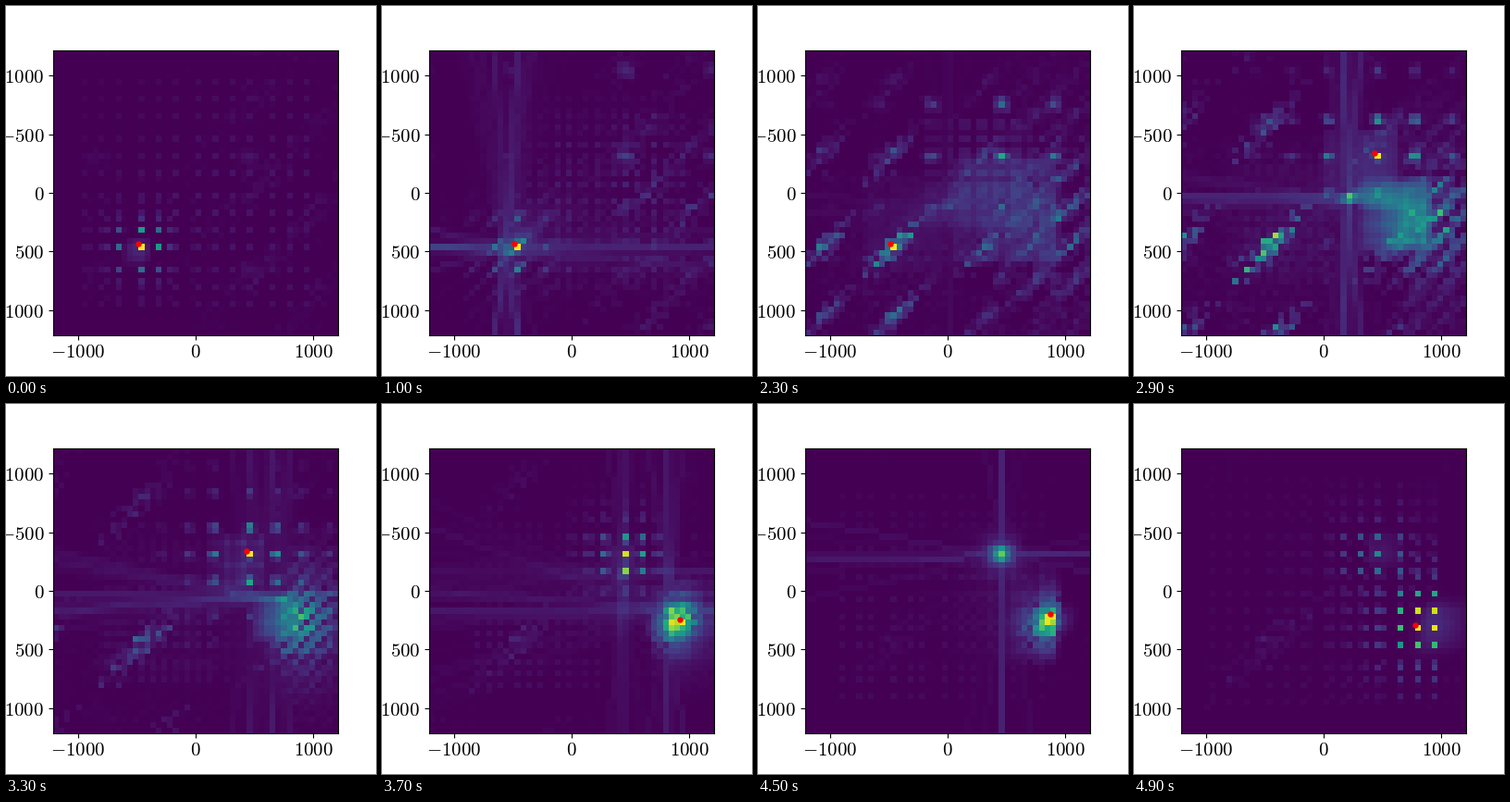
Write a matplotlib script that moves like this. It is 400 px wide and 400 px high and loops after 5000 ms.

```python
import numpy as np
import matplotlib.pyplot as plt
from matplotlib.animation import FuncAnimation

N = FRAMES = 50
HALF = 1212.6
CELL = 2 * HALF / N
rng = np.random.default_rng(4)

# Cameras sit in the centre of their cell, on an even grid on all six walls.
CAMERAS = np.floor(25.05 + 3.27 * np.arange(-6, 7)) + .5
CAM_X, CAM_Y = (g.reshape(-1, 1) for g in np.meshgrid(CAMERAS, CAMERAS))


def track(*keys, spacing=.25):
    """Hits (x, y, z, brightness) along straight pieces between keys."""
    keys = np.array(keys, float)
    lengths = np.linalg.norm(np.diff(keys[:, :3], axis=0), axis=1)
    along = np.append(0, np.cumsum(lengths))
    steps = np.arange(0, along[-1], spacing)
    hits = np.column_stack([np.interp(steps, along, k) for k in keys.T])
    hits[:, :3] += rng.normal(0, .2, (len(hits), 3))
    return hits


def knot(center, reach, blur, light, count=80):
    """A bright cluster of hits, drawn out along a diagonal."""
    pos = np.array(center) + rng.normal(0, blur, (count, 3))
    pos += rng.normal(0, reach, (count, 1)) * np.array([1, -1, 0])
    return np.column_stack([pos, np.full(count, light / count)])


TRACKS = np.vstack([
    track((15.5, 34.5, 4.6, .1), (12.8, 35.6, 10, .1), (19.8, 29.8, 15, .1),
          (24.5, 27.3, 23, .01), (31, 25.5, 32, .1), (41, 26.5, 34, .1),
          (43, 30, 41, .1)),
    track((33.5, 24, 35, .05), (34.4, 18.7, 42, .1)),
])
HITS = np.vstack([
    TRACKS,
    knot((15.5, 34.5, 4.6), .4, .12, 20),
    knot((42.9, 30.4, 41.8), 1.1, .2, 60),
    knot((34.5, 18.5, 43.5), 0, .15, 14),
])


def splat(x, y, weight):
    x, y, weight = (a.ravel() for a in np.broadcast_arrays(x, y, weight))
    img = np.histogram2d(y, x, bins=N, range=((0, N), (0, N)),
                         weights=weight)[0]
    return img / max(img.max(), 1e-9)


def end_wall(depth, z):
    """Rays from one end wall through the hits, cut at a depth."""
    x, y, _, light = HITS.T
    off_axis = (CAM_X - x) ** 2 + (CAM_Y - y) ** 2
    weight = light / z ** 2 * (z * z / (z * z + off_axis)) ** 2
    return splat(CAM_X + (x - CAM_X) * depth / z,
                 CAM_Y + (y - CAM_Y) * depth / z, weight)


def side_walls(depth):
    """Rays from the four side walls that stay inside this slice."""
    x, y, z, light = (a[:, None, None] for a in TRACKS.T)
    light = light * np.exp(-((z - depth) / 1.2) ** 2)
    cams = CAMERAS[:, None]
    run = np.arange(N) + .5
    xs, ys, weights = [], [], []
    for along, across, swap in ((x, y, False), (y, x, True)):
        for far in (False, True):
            gap = N - along if far else along
            line = cams + (across - cams) * run / gap
            ahead = np.broadcast_to(N - run if far else run, line.shape)
            near = light / gap * np.exp(-((cams - across) / 3) ** 2)
            xs.append(line if swap else ahead)
            ys.append(ahead if swap else line)
            weights.append(np.broadcast_to(near, line.shape))
    return splat(np.array(xs), np.array(ys), np.array(weights))


def slice_at(t):
    depth, z = t + .5, HITS[:, 2]
    row_gap = np.min(abs(CAMERAS - depth))
    front = np.interp(t, (23, 33, 41, 49), (1, .55, .25, .12))
    back = np.interp(t, (0, 10, 23, 33), (.12, .3, .6, 1))
    side = .5 * np.exp(-row_gap ** 2 / 2)
    img = np.maximum(front * end_wall(depth, z),
                     back * end_wall(N - depth, N - z))
    img = np.maximum(img, side * side_walls(depth))
    return img / img.max()


plt.rcParams.update({"mathtext.fontset": "cm", "font.size": 15})
fig, ax = plt.subplots(figsize=(4, 4), dpi=100)
image = ax.imshow(np.zeros((N, N)), cmap="viridis", vmin=0, vmax=1,
                  interpolation="nearest", extent=(-HALF, HALF, HALF, -HALF))
peak, = ax.plot([0], [0], "o", color="red", ms=3.6, mew=1)
ax.set_xlim(-HALF, HALF)
ax.set_ylim(HALF, -HALF)
for axis, step in ((ax.xaxis, 1000), (ax.yaxis, 500)):
    ticks = range(-1000, 1001, step)
    axis.set_ticks(ticks, [f"${v}$" for v in ticks])
ax.tick_params(axis="x", pad=1.9)


def update(t):
    img = slice_at(t)
    image.set_data(img)
    row, col = np.unravel_index(img.argmax(), img.shape)
    peak.set_data([col * CELL - HALF], [row * CELL - HALF])
    return image, peak


anim = FuncAnimation(fig, update, frames=FRAMES, interval=100, repeat=True,
                     repeat_delay=0)
plt.show()
```
